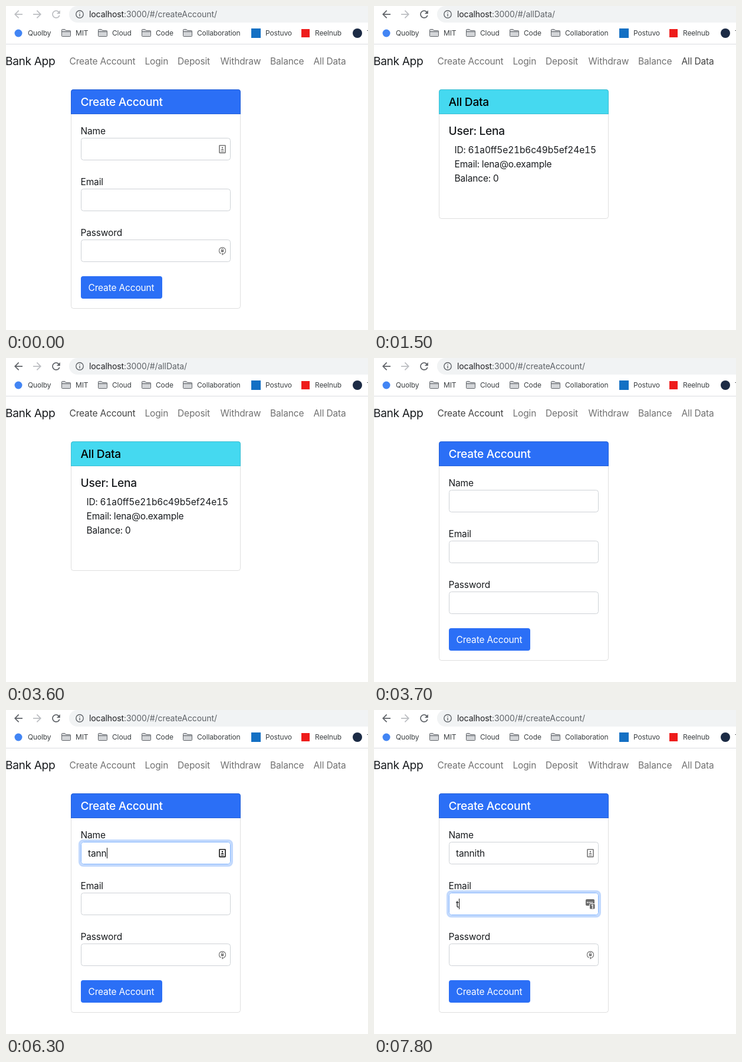
Animation of 614x548 px, one loop 8 s. Source, as an HTML page:

```html
<!DOCTYPE html>
<html lang="en">
<head>
<meta charset="utf-8">
<title>Bank App</title>
<style>
  html, body { margin: 0; width: 100%; height: 100%; overflow: hidden; background: #fff; }
  svg { display: block; width: 614px; height: 548px; font-family: Inter, "Open Sans", sans-serif; }
  text { font-size: 15.5px; letter-spacing: -.01em; fill: #181b1e; white-space: pre; }
  .mark { font-size: 12px; letter-spacing: -.012em; fill: #3c4043; }
  .url { font-size: 14px; letter-spacing: -.006em; fill: #202124; }
  .url tspan { fill: #5f6368; }
  .brand { font-size: 19.2px; letter-spacing: -.02em; }
  .title { font-size: 19.2px; font-weight: 500; letter-spacing: -.014em; }
  .light { fill: #fff; }
  .dark { fill: #000; }
  .link { fill: #707070; }
  .link.on { fill: #424242; }
  #record { font-variant-numeric: tabular-nums; }
</style>
</head>
<body>
<svg id="stage" viewBox="0 0 614 548"></svg>
<script>
const LOOP = 8000;
const BLUE = '#2b6ff6', CYAN = '#45d9f0', GREY = '#5f6368', PALE = '#bcbec2';
const NAME = 'tannith';

const text = (x, y, str, cls = '', id = '') =>
  `<text x="${x}" y="${y}" class="${cls}"${id && ` id="${id}"`}>${str}</text>`;
const rect = (x, y, w, h, r, attrs) =>
  `<rect x="${x}" y="${y}" width="${w}" height="${h}" rx="${r}" ${attrs}/>`;

// Browser chrome
const folder = x => `<g transform="translate(${x} 39)" fill="#d3d5d8" stroke="${GREY}">
  <path d="M.5 11.5V1.5Q.5 .5 1.5 .5H6L7.6 2.5H14.5Q15.5 2.5 15.5 3.5V11.5Q15.5 12.5 14.5 12.5H1.5Q.5 12.5 .5 11.5Z"/>
  <path d="M.5 4.5H15.5"/></g>`;

const folders = [['MIT', 94], ['Cloud', 156], ['Code', 230], ['Collaboration', 300]];
const chrome = `
  ${rect(107, 0, 540, 28, 14, 'fill="#f1f3f4"')}
  <path id="back" transform="translate(10.5 3.5) scale(.875)" d="M20 11H7.83l5.59-5.59L12 4l-8 8 8 8 1.41-1.41L7.83 13H20z"/>
  <path fill="${PALE}" transform="translate(63.5 3.5) scale(-.875 .875)" d="M20 11H7.83l5.59-5.59L12 4l-8 8 8 8 1.41-1.41L7.83 13H20z"/>
  <path id="reload" transform="translate(74.8 3.8) scale(.85)" d="M17.65 6.35C16.2 4.9 14.21 4 12 4c-4.42 0-8 3.58-8 8s3.58 8 8 8c3.73 0 6.84-2.55 7.73-6h-2.08c-.82 2.33-3.04 4-5.65 4-3.31 0-6-2.69-6-6s2.69-6 6-6c1.66 0 3.14.69 4.22 1.78L13 11h7V4z"/>
  <g fill="none" stroke="${GREY}" stroke-width="1.4">
    <circle cx="125" cy="14" r="6.2"/><path d="M125 13.2V17.4M125 10.4V11.8"/></g>
  <text class="url" x="141" y="19">localhost<tspan id="path"></tspan></text>
  <circle cx="21" cy="46" r="6.5" fill="#4285f4"/>${text(37, 50, 'Quolby', 'mark')}
  ${folders.map(([name, x]) => folder(x) + text(x + 24, 50, name, 'mark')).join('')}
  ${rect(416, 38, 16, 16, 0, 'fill="#1470c4"')}${text(440, 50, 'Postuvo', 'mark')}
  ${rect(501, 39, 14, 14, 0, 'fill="#ee1c1b"')}${text(524, 50, 'Reelnub', 'mark')}
  <circle cx="596" cy="46" r="8" fill="#1c2b45"/>${text(612, 50, 'T', 'mark')}
  <path d="M0 64.5H614" stroke="#dadce0"/>`;

// Navigation: label, x, and when it is highlighted by hover or focus
const links = [
  ['Create Account', 107.5, 3200, 4800],
  ['Login', 235.5, 3000, 3200],
  ['Deposit', 291, 2900, 3000],
  ['Withdraw', 363.5, 2800, 2900],
  ['Balance', 448, 2600, 2800],
  ['All Data', 521.5, 1200, 3500]
];
const nav = text(-1, 100, 'Bank App', 'brand') +
  links.map(([label, x], i) => text(x, 99, label, 'link', 'link' + i)).join('');

// Cards
const card = (bottom, color, title, cls) => `
  ${rect(110.5, 141.5, 287, bottom - 141.5, 4, 'fill="none" stroke="#000" stroke-opacity=".125"')}
  <path d="M110 183V145.5Q110 141 114.5 141H393.5Q398 141 398 145.5V183Z" fill="${color}"/>
  <path d="M110.5 182.5V145.5Q110.5 141.5 114.5 141.5H393.5Q397.5 141.5 397.5 145.5V182.5Z" fill="none" stroke="#000" stroke-opacity=".125"/>
  ${text(126.5, 168.5, title, 'title ' + cls)}`;

const field = (id, label, y) => `
  ${text(126.5, y - 6, label)}
  ${rect(125, y - 2, 258, 42, 6, `id="${id}Ring" fill="none" stroke="#c2d9fd" stroke-width="4"`)}
  ${rect(127.5, y + .5, 253, 37, 4, `id="${id}Box" fill="#fff"`)}
  ${text(139, y + 25, '', '', id + 'Text')}
  <path id="${id}Caret" d="M0 ${y + 10}V${y + 28}" stroke="#111"/>`;

const personIcon = `<g id="personIcon">
  <rect x="362" y="235.8" width="10" height="12.6" rx=".6" fill="none" stroke="currentColor" stroke-width="1.6"/>
  <circle cx="367" cy="239.8" r="1.3" fill="currentColor"/>
  <path d="M364.5 244V243.4Q367 240.6 369.5 243.4V244Z" fill="currentColor"/>
  <path d="M364.5 246H369.5" stroke="currentColor"/></g>`;
const badgeIcon = `<g id="badgeIcon" fill="#6b6b6b">
  ${rect(359, 320, 15, 11, 2, '')}
  <path d="M361 325.5H371" stroke="#fff" stroke-width="1.8" stroke-dasharray="1.8 1.2"/>
  ${rect(365.5, 327.5, 9.5, 9.5, 2, 'stroke="#fff"')}
  <text x="368.3" y="335.6" class="light" style="font-size:9px;font-weight:700">1</text></g>`;
const lockIcon = `<g id="lockIcon" fill="none" stroke="#777" stroke-width="1.3">
  <path d="M364.5 418.9A5.6 5.6 0 1 1 369.5 418.9"/>
  <path d="M366 417.4L369.6 419.2L366.6 421.8Z" fill="#777" stroke="none"/>
  <path d="M365.6 413V411.6A1.4 1.4 0 0 1 368.4 411.6V413" stroke-width="1"/>
  ${rect(364.8, 412.8, 4.4, 3.4, .5, 'fill="#777" stroke="none"')}</g>`;

const stage = document.getElementById('stage');
stage.innerHTML = `${rect(0, 0, 614, 548, 0, 'fill="#fff"')}${chrome}${nav}
  <g id="form">
    ${card(511.5, BLUE, 'Create Account', 'light')}
    ${field('name', 'Name', 223)}${field('email', 'Email', 309)}${field('pass', 'Password', 395)}
    ${personIcon}${badgeIcon}${lockIcon}
    ${rect(127, 457, 138, 38, 4, `fill="${BLUE}"`)}
    ${text(139.5, 482, 'Create Account', 'light')}
  </g>
  <g id="data">
    ${card(359.5, CYAN, 'All Data', 'dark')}
    <g id="record">
      ${text(126.5, 217.5, 'User: Lena', 'title')}
      ${text(136.5, 249, 'ID: 61a0ff5e21b6c49b5ef24e15')}
      ${text(136.5, 273, 'Email: lena@o.example')}
      ${text(136.5, 297, 'Balance: 0')}
    </g>
  </g>`;

const el = {};
stage.querySelectorAll('[id]').forEach(node => el[node.id] = node);

const within = (t, from, to) => t >= from && t < to;
const ramp = (t, from) => Math.min(1, Math.max(0, (t - from) / 200));
const show = (node, on) => node.setAttribute('display', on ? 'inline' : 'none');
const typed = (word, times, t) => word.slice(0, times.filter(at => t >= at).length);

function mix(a, b, p) {
  return `rgb(${a.map((v, i) => Math.round(v + (b[i] - v) * p))})`;
}

function drawField(id, value, focus, caret) {
  el[id + 'Ring'].setAttribute('opacity', focus);
  el[id + 'Box'].setAttribute('stroke', mix([206, 210, 214], [134, 183, 254], focus));
  el[id + 'Text'].textContent = value;
  const x = value ? Math.round(139 + el[id + 'Text'].getComputedTextLength()) + .5 : 140.5;
  el[id + 'Caret'].setAttribute('transform', `translate(${x} 0)`);
  show(el[id + 'Caret'], caret);
}

function render(t) {
  const onData = within(t, 1400, 3700);
  const tone = t < 800 ? PALE : GREY;
  el.back.setAttribute('fill', tone);
  el.reload.setAttribute('fill', tone);
  el.path.textContent = ':3000/#/' + (onData ? 'allData/' : 'createAccount/');
  links.forEach(([, , from, to], i) =>
    el['link' + i].classList.toggle('on', within(t, from, to)));

  show(el.data, onData);
  show(el.record, t >= 1500);
  show(el.form, !onData);
  if (onData) return;

  const nameFocus = ramp(t, 4750) - ramp(t, 7250);
  const emailFocus = ramp(t, 7250);
  const nameCaret = within(t, 4800, 5400) || within(t, 5900, 7300);
  drawField('name', typed(NAME, [6000, 6100, 6200, 6300, 6600, 6800, 6900], t), nameFocus, nameCaret);
  drawField('email', typed(NAME, [7800], t), emailFocus, t >= 7300);
  drawField('pass', '', 0, false);

  const helpers = !within(t, 3700, 4800);
  show(el.personIcon, helpers);
  show(el.lockIcon, helpers);
  show(el.badgeIcon, t >= 7300);
  el.personIcon.setAttribute('color', within(t, 4800, 7300) ? '#151515' : '#777');
}

const start = performance.now();
function tick() {
  render((performance.now() - start) % LOOP);
  requestAnimationFrame(tick);
}
tick();
</script>
</body>
</html>
```
